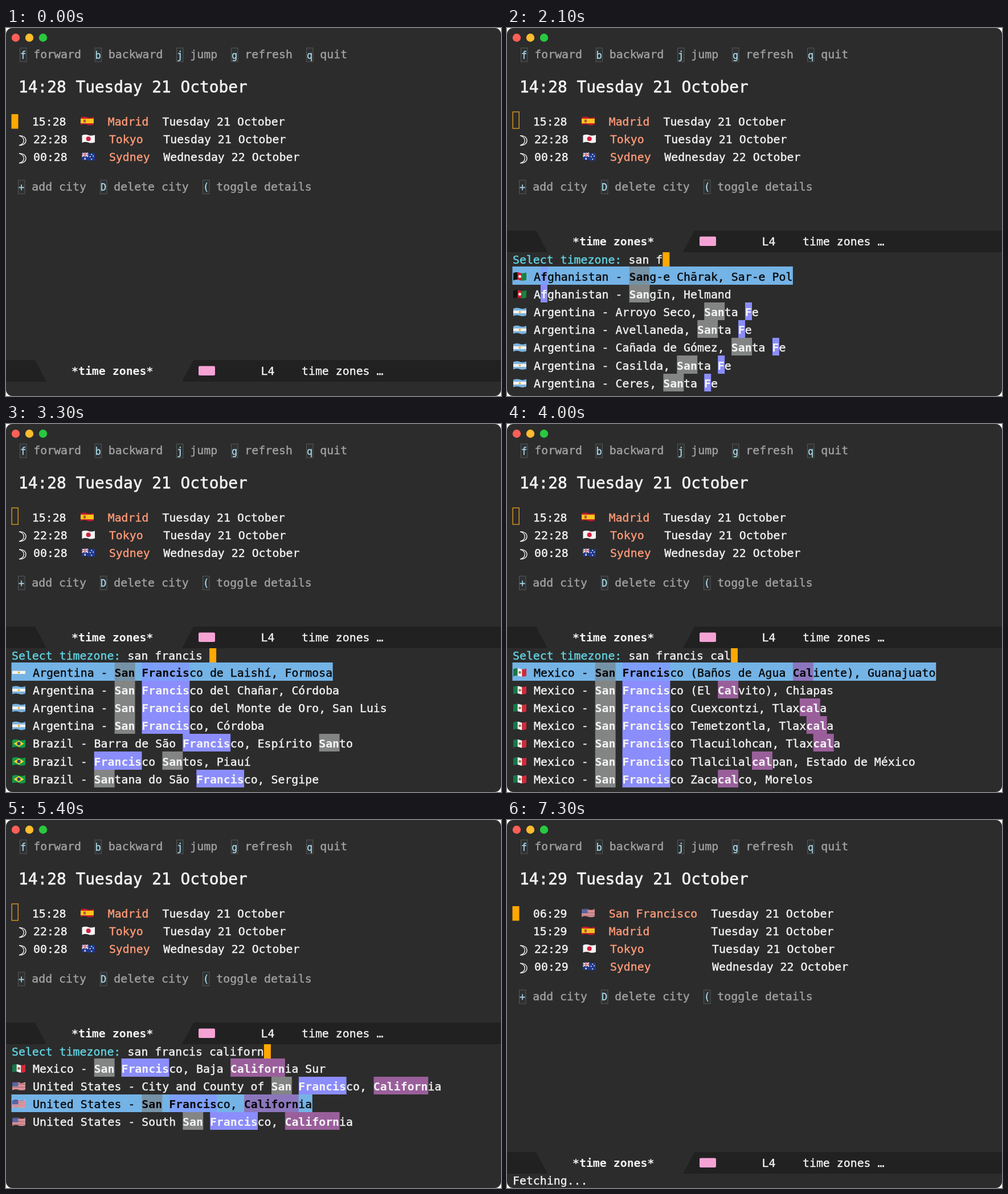
An HTML page that plays this animation: 869 px wide and 645 px high, repeating every 8 s.

```html
<!DOCTYPE html>
<html lang="en">
<head>
<meta charset="utf-8">
<title>Time zones</title>
<style>
  html, body { margin: 0; width: 100%; height: 100%; overflow: hidden; background: #fff; }
  svg { display: block; width: 869px; height: 645px; }
  text { font: 19.88px "DejaVu Sans Mono", monospace; white-space: pre; stroke-width: .4px; }
  .b { font-weight: bold; stroke: none; }
</style>
</head>
<body>
<svg id="stage" viewBox="0 0 869 645">
  <defs>
    <clipPath id="wave"><path d="M0 2Q6-.5 11.5 1.5T23 1V14Q17 16.5 11.5 14.5T0 15Z"/></clipPath>
    <clipPath id="win"><rect width="869" height="645" rx="11"/></clipPath>
  </defs>
  <g clip-path="url(#win)">
    <rect width="869" height="645" fill="#2c2c2c"/>
    <g id="view"></g>
  </g>
</svg>
<script>
const LOOP = 8000, CW = 11.97, ROW = 31.2;
const FG = '#f4f4f4', GREY = '#a2a2a2', CITY = '#ff9b78', KEY = '#a8d8ea',
      PROMPT = '#62d4e3', CURSOR = '#ffa800', DARK = '#212121', SELECT = '#74b3e6';
const MATCH = ['#838585', '#8b8dfc', '#9a5f9b'];
const MATCH_SELECTED = ['#7592a6', '#7d9efa', '#8b76bd'];

const rect = (x, y, w, h, fill, more = '') =>
  `<rect x="${x}" y="${y}" width="${w}" height="${h}" fill="${fill}" ${more}/>`;
const path = (d, fill, more = '') => `<path d="${d}" fill="${fill}" ${more}/>`;
const dot = (x, y, r, fill) => `<circle cx="${x}" cy="${y}" r="${r}" fill="${fill}"/>`;
const text = (x, y, s, fill = FG, more = '') =>
  `<text x="${x}" y="${y}" fill="${fill}" stroke="${fill}" ${more}>${s}</text>`;

// Flags: [country, stripe direction, stripe colours, extra shapes]
const usStripes = Array.from({ length: 13 }, (_, i) => i % 2 ? '#f3f3f3' : '#c8313e');
const COUNTRY = {
  AD: ['Andorra', 'v', ['#1a3fa0', '#f5cf3c', '#cf1f3a'], dot(11.5, 8, 2.8, '#c0845a')],
  AE: ['United Arab Emirates', 'h', ['#15803f', '#f5f5f5', '#151515'], rect(0, 0, 6.5, 16, '#e3202e')],
  AF: ['Afghanistan', 'v', ['#111', '#c8202c', '#16843c'], dot(11.5, 8, 2.5, '#eee')],
  AR: ['Argentina', 'h', ['#79b4e2', '#f5f5f5', '#79b4e2'], dot(11.5, 8, 1.9, '#e5b548')],
  AT: ['Austria', 'h', ['#de2c38', '#f5f5f5', '#de2c38']],
  AU: ['Australia', 'h', ['#20398c'], path('M0 1L11 8M11 1L0 8M5.5 0V9M0 4.5H11', 'none', 'stroke="#eee" stroke-width="2"') +
    path('M5.5 0V9M0 4.5H11', 'none', 'stroke="#d2283c"') +
    dot(5.5, 12, 1.3, '#fff') + dot(17, 4, 1, '#fff') + dot(20, 7, 1, '#fff') + dot(14.5, 8, 1, '#fff') + dot(17, 12.5, 1, '#fff')],
  BR: ['Brazil', 'h', ['#139a48'], path('M2.5 8L11.5 2.5 20.5 8 11.5 13.5Z', '#fbd625') + dot(11.5, 8, 3.1, '#27418f')],
  CO: ['Colombia', 'h', ['#f9d22c', '#f9d22c', '#203f95', '#ce2435']],
  CR: ['Costa Rica', 'h', ['#1e3c8c', '#f3f3f3', '#d22638', '#d22638', '#f3f3f3', '#1e3c8c']],
  DO: ['Dominican Republic', 'v', ['#1e3f91', '#d22638'], rect(0, 8, 11.5, 8, '#d22638') + rect(11.5, 8, 12, 8, '#1e3f91') +
    rect(10, 0, 3, 16, '#fff') + rect(0, 6.5, 23, 3, '#fff')],
  ES: ['Spain', 'h', ['#c81c2c', '#fbc51b', '#fbc51b', '#c81c2c'], rect(5, 5.5, 4, 5, '#b0543c')],
  HN: ['Honduras', 'h', ['#3a7fd0', '#f5f5f5', '#3a7fd0'], dot(11.5, 8, 1.6, '#3a7fd0')],
  JP: ['Japan', 'h', ['#f3f3f3'], dot(11.5, 8, 4, '#d1203c')],
  MX: ['Mexico', 'v', ['#14784a', '#f5f5f5', '#d4283c'], dot(11.5, 8, 2.3, '#9c7446')],
  NI: ['Nicaragua', 'h', ['#3a7fd0', '#f5f5f5', '#3a7fd0'], dot(11.5, 8, 1.5, '#c9b04a')],
  US: ['United States', 'h', usStripes, rect(0, 0, 10.5, 8.5, '#3c4a8c') +
    path('M1 3H10M1 5H10M1 7H10', 'none', 'stroke="#cfd4ea" stroke-width=".8" stroke-dasharray="1 1"')],
};

function flag(code, x, y) {
  const [, dir, colours, extra = ''] = COUNTRY[code], n = colours.length;
  const bars = colours.map((c, i) => dir === 'h'
    ? rect(0, i * 16 / n, 23, 16 / n + .1, c)
    : rect(i * 23 / n, 0, 23 / n + .1, 16, c)).join('');
  return `<g transform="translate(${x} ${y})"><g clip-path="url(#wave)">${bars}${extra}</g></g>`;
}

// Candidate lists
const group = (code, ...places) => places.map(p => [code, `${COUNTRY[code][0]} - ${p}`]);
const arinsal = 'Arinsal, La Massana', pas = 'Pas de la Casa, Encamp',
      sant = 'Sant Julià de Lòria, Sant Julià de Lòria', massana = 'la Massana, La Massana';
const sang = group('AF', 'Sang-e Chārak, Sar-e Pol', 'Sangīn, Helmand');
const santaFe = ['Arroyo Seco, Santa Fe', 'Avellaneda, Santa Fe'];
const sanFrancisco = group('AR', 'San Francisco de Laishí, Formosa', 'San Francisco del Chañar, Córdoba',
  'San Francisco del Monte de Oro, San Luis', 'San Francisco, Córdoba');
const brazil = ['Barra de São Francisco, Espírito Santo', 'Francisco Santos, Piauí'];
const spa = 'San Francisco (Baños de Agua Caliente), Guanajuato', baja = 'San Francisco, Baja California Sur';
const states = group('US', 'City and County of San Francisco, California',
  'San Francisco, California', 'South San Francisco, California');

const LIST = {
  all: group('AD', 'Andorra la Vella, Andorra la Vella', arinsal, 'Canillo, Canillo',
    'El Tarter, Canillo', 'Encamp, Encamp', 'Ordino, Ordino', pas),
  s: [...group('AD', arinsal, pas, sant, massana, 'les Escaldes, Escaldes-Engordany'),
    ...group('AE', 'Abu Dhabi, Abu Dhabi', 'Ajman, Ajman')],
  sa: [...group('AD', arinsal, pas, sant, massana), ...group('AE', 'Musaffah, Abu Dhabi'), ...sang],
  san: [...group('AD', arinsal, sant, massana), ...sang, ...group('AR', ...santaFe)],
  f: [...sang, ...group('AR', ...santaFe, 'Cañada de Gómez, Santa Fe', 'Casilda, Santa Fe', 'Ceres, Santa Fe')],
  fran: [...sanFrancisco, ...group('AT', 'Frantschach-Sankt Gertraud, Carinthia'), ...group('BR', ...brazil)],
  franc: [...sanFrancisco, ...group('BR', ...brazil, 'Santana do São Francisco, Sergipe')],
  ca: [...group('CO', 'San Francisco, Cundinamarca'), ...group('CR', 'San Francisco, Heredia'),
    ...group('DO', 'San Francisco de Macorís, Duarte'), ...group('HN', 'San Francisco de Opalaca, Intibucá'),
    ...group('MX', 'Colonia San Francisco Cabecera, Estado de México', 'San Francisco Acatepec, Puebla'),
    ...group('NI', 'San Francisco Libre, Managua')],
  cal: group('MX', spa, 'San Francisco (El Calvito), Chiapas', 'San Francisco Cuexcontzi, Tlaxcala',
    'San Francisco Temetzontla, Tlaxcala', 'San Francisco Tlacuilohcan, Tlaxcala',
    'San Francisco Tlalcilalcalpan, Estado de México', 'San Francisco Zacacalco, Morelos'),
  cali: [...group('MX', spa, 'San Francisco Ixcalitla, Puebla', baja), ...states],
  calif: [...group('MX', baja), ...states],
};

// Timeline
const HOME = [['', '15:28', 'ES', 'Madrid'], ['☽', '22:28', 'JP', 'Tokyo'], ['☽', '00:28', 'AU', 'Sydney']];
const LATER = [['', '06:28', 'US', 'San Francisco'], ...HOME].map(r => [r[0], r[1].replace(':28', ':29'), r[2], r[3]]);
const before = echo => ({ rows: HOME, now: '14:28', echo, cursor: 1 });
const after = (cursor, echo) => ({ rows: LATER, now: '14:29', echo, cursor });
const ask = (input, list, pick = 0) => ({ rows: HOME, now: '14:28', input, list: LIST[list], pick });
const STEPS = [
  [0, before()], [300, before('Fetching...')],
  [1100, ask('', 'all')],
  [1500, ask('s', 's')], [1600, ask('sa', 'sa')], [1800, ask('san', 'san')],
  [2100, ask('san f', 'f')], [2200, ask('san fr', 'fran')], [2300, ask('san fra', 'fran')],
  [2500, ask('san fran', 'fran')], [2600, ask('san franc', 'franc')],
  [2800, ask('san franci', 'franc')], [2900, ask('san francis', 'franc')],
  [3300, ask('san francis ', 'franc')],
  [3700, ask('san francis c', 'franc')], [3800, ask('san francis ca', 'ca')],
  [4000, ask('san francis cal', 'cal')], [4100, ask('san francis cali', 'cali')],
  [4300, ask('san francis calif', 'calif')], [4400, ask('san francis califo', 'calif')],
  [4500, ask('san francis califor', 'calif')], [4700, ask('san francis californ', 'calif')],
  [5200, ask('san francis californ', 'calif', 1)], [5400, ask('san francis californ', 'calif', 2)],
  [5800, after(1)], [6300, after(0)], [6800, after(1)], [7300, after(1, 'Fetching...')],
];

function keys(y, items) {
  return items.map(([x, key, label]) =>
    rect(x + .5, y - 18, 11.5, 24, '#2e3031', 'stroke="#555858"') +
    text(x + 6.2, y + .5, key, KEY, 'text-anchor="middle" style="font-size:17px"') +
    text(x + 24.3, y, label, GREY)).join('');
}

const moon = (x, y) => path(`M${x} ${y}C${x + 16} ${y - 1} ${x + 16} ${y + 18} ${x} ${y + 17}C${x + 11} ${y + 14} ${x + 11} ${y + 3} ${x} ${y}Z`,
  'none', `stroke="${FG}" stroke-width="1.3"`);

function clocks({ rows, now }) {
  const wide = Math.max(...rows.map(r => r[3].length));
  return text(22, 113, now + ' Tuesday 21 October', FG, 'style="font-size:27.8px;stroke-width:.6px"') +
    rows.map(([night, time, code, city], i) => {
      const y = 170.5 + i * ROW, dx = night ? 2.2 : 0;
      return (night ? moon(23, y - 13) : '') + text(45.8 + dx, y, time) +
        flag(code, 131 + dx, y - 15.5) + text(178.7 + dx, y, city, CITY) +
        text(178.7 + dx * .8 + (wide + 2) * CW, y, city === 'Sydney' ? 'Wednesday 22 October' : 'Tuesday 21 October');
    }).join('') +
    keys(284.7 + (rows.length - 3) * ROW, [[21, '+', 'add city'], [165, 'D', 'delete city'], [345, '(', 'toggle details']]);
}

function modeLine(y) {
  return path(`M0 ${y}H51L71 ${y + 38}H0Z`, DARK) +
    path(`M869 ${y}H329L309 ${y + 38}H869Z`, DARK) +
    text(115, y + 26, '*time zones*', FG, 'class="b"') +
    rect(338, y + 10.5, 29, 16.5, '#f5a3d4', 'rx="2"') +
    text(447.5, y + 26, 'L4') + text(519, y + 26, 'time zones …');
}

function candidate([code, label], i, picked, words) {
  const x = 47, y = 418.4 + i * ROW, top = Math.round(y), height = Math.round(y + ROW) - top;
  const marks = Array(label.length).fill(-1);
  words.forEach((w, k) => {
    const at = label.toLowerCase().indexOf(w);
    if (at >= 0) marks.fill(k, at, at + w.length);
  });
  let back = picked ? rect(9.5, top, x - 9.5 + label.length * CW, height, SELECT) : '', spans = '';
  for (let a = 0, b; a < label.length; a = b) {
    for (b = a + 1; b < label.length && marks[b] === marks[a]; b++);
    const part = label.slice(a, b), k = marks[a];
    if (k >= 0) back += rect(x + a * CW, top, (b - a) * CW, height, (picked ? MATCH_SELECTED : MATCH)[k]);
    spans += k < 0 ? part : `<tspan class="b">${part}</tspan>`;
  }
  return back + flag(code, 11, y + 9) + text(x, y + 24.2, spans, picked ? '#080808' : FG);
}

function picker({ input, list, pick }) {
  const label = 'Select timezone: ', x = 10 + label.length * CW;
  const words = input.split(' ').filter(Boolean);
  return text(10, 412.5, label, PROMPT) + text(x, 412.5, input) +
    rect(x + input.length * CW, 393, 12, 25, CURSOR) +
    list.map((c, i) => candidate(c, i, i === pick, words)).join('');
}

function render(s) {
  const lights = dot(17, 17, 7.2, '#ff5f57') + dot(41, 17, 7.2, '#febc2e') + dot(65, 17, 7.2, '#28c840');
  const menu = keys(53, [[24, 'f', 'forward'], [155.5, 'b', 'backward'], [299, 'j', 'jump'], [395, 'g', 'refresh'], [527, 'q', 'quit']]);
  const bottom = s.list
    ? rect(10.2, 147, 11, 29, 'none', 'stroke="#dc981c" stroke-width="1.4"') + modeLine(355) + picker(s)
    : (s.cursor ? rect(9.5, 151, 12, 25.5, CURSOR) : '') + modeLine(582) + (s.echo ? text(10, 639, s.echo) : '');
  return lights + menu + clocks(s) + bottom;
}

const view = document.getElementById('view');
let shown;
function tick() {
  const t = performance.now() % LOOP;
  const step = STEPS.findLast(([at]) => at <= t);
  if (step !== shown) {
    shown = step;
    view.innerHTML = render(step[1]);
  }
  requestAnimationFrame(tick);
}
tick();
</script>
</body>
</html>
```
